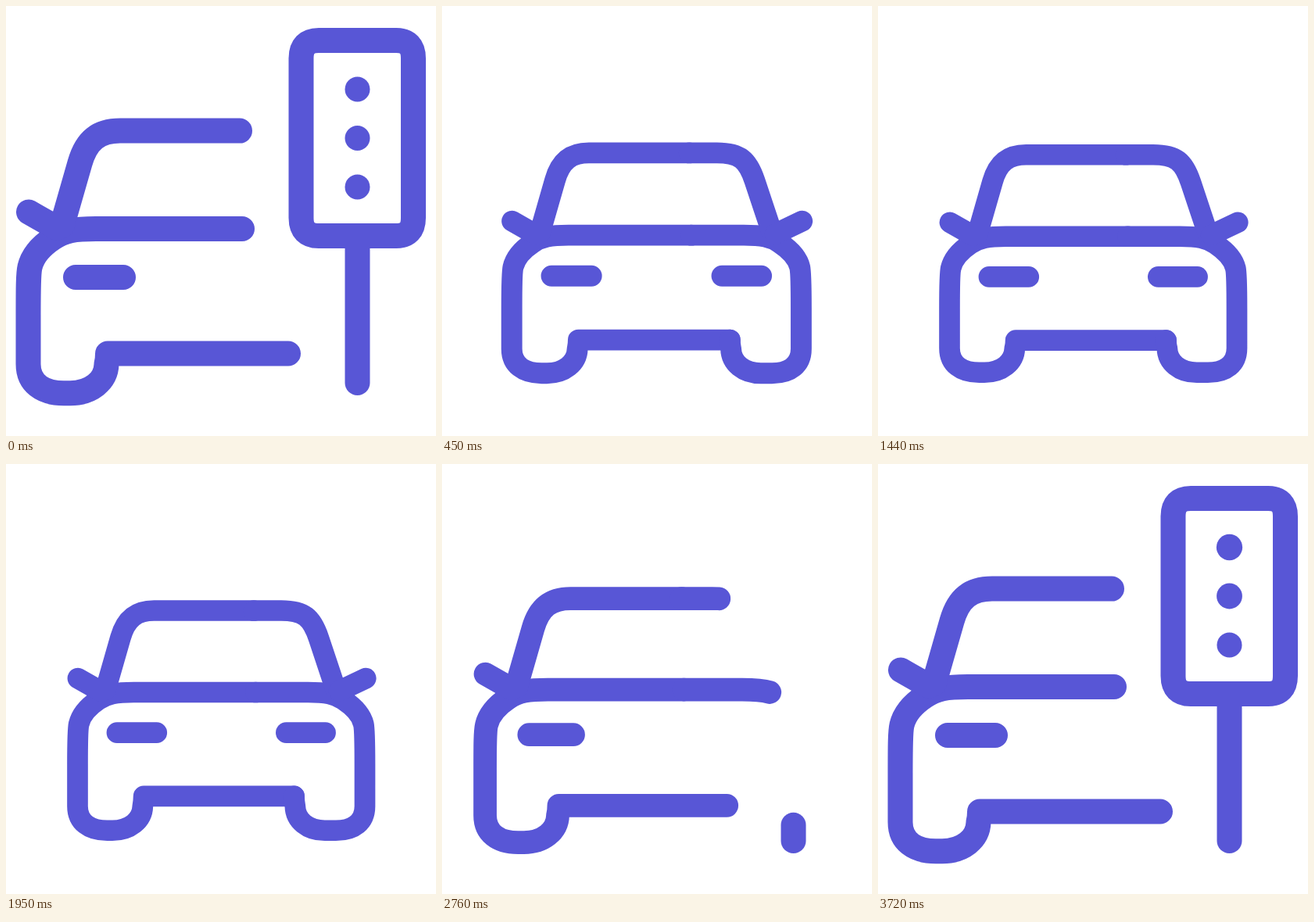
An HTML page for the animation above (3.75 s loop, 550 px wide and 550 px high).

```html
<!DOCTYPE html>
<html lang="en">
<head>
<meta charset="utf-8">
<title>Car and traffic light</title>
<style>
  html, body { margin: 0; width: 100%; height: 100%; overflow: hidden; background: #fff; }
  svg { display: block; width: 100vw; height: 100vh; }
  .line { fill: none; stroke: #5856d6; stroke-width: 32; stroke-linecap: round; stroke-linejoin: round; }
  #dots { fill: #5856d6; }
</style>
</head>
<body>
<svg viewBox="0 0 550 550">
  <g id="car" class="line">
    <path id="left"/>
    <path id="right" pathLength="1"/>
    <g id="body">
      <path d="M29 263.5L65 284M72 281L75 269L94.5 201C103 171 119 159.6 146 159.6H299M89 347H150"/>
      <path id="roof" pathLength="1" d="M299 159.6H341C376 159.6 388 170 398.7 202L421 269L425 281"/>
      <path id="mirror" pathLength="1" d="M430 283L471 263.5"/>
      <path id="lamp" pathLength="1" d="M348.7 347H409"/>
    </g>
  </g>
  <g class="line">
    <path id="pole" pathLength="1" d="M449.5 482V294"/>
    <path id="frame" pathLength="1" d="M449.5 294H400Q377.5 294 377.5 271V67Q377.5 44 400 44H499Q521 44 521 67V271Q521 294 499 294Z"/>
  </g>
  <g id="dots">
    <circle cx="449.5" cy="106.5"/>
    <circle cx="449.5" cy="169"/>
    <circle cx="449.5" cy="231.5"/>
  </g>
</svg>
<script>
const LOOP = 3750;
const $ = id => document.getElementById(id);
const dots = [...$('dots').children];

const ramp = (t, a, b) => Math.min(1, Math.max(0, (t - a) / (b - a)));
const cubic = u => u < .5 ? 4 * u ** 3 : 1 - 4 * (1 - u) ** 3;
const sine = u => (1 - Math.cos(Math.PI * u)) / 2;
// Rises during the first span, falls during the second
const between = (t, a, b, c, d, ease = cubic) => ease(ramp(t, a, b)) - ease(ramp(t, c, d));

// Time and vertical offset of the body on its suspension
const bounce = [[600, 0], [870, 3.6], [1060, 1.2], [1260, 3.6], [1455, 1.2],
  [1700, 3.6], [1940, -1.5], [2190, 3.6], [2445, -.7], [2600, 0]];

function bob(t) {
  let y = 0;
  for (let i = 1; i < bounce.length; i++) {
    const [t0, y0] = bounce[i - 1], [t1, y1] = bounce[i];
    y += (y1 - y0) * sine(ramp(t, t0, t1));
  }
  return y;
}

function trim(id, p) {
  const el = $(id);
  el.style.visibility = p > .001 ? 'visible' : 'hidden';
  el.setAttribute('stroke-dasharray', p > .999 ? 'none' : `${p} 2`);
}

function dotSize(t, i) {
  const start = 3015 - i * 67;
  if (t < start) return 1 - cubic(ramp(t, i * 30, 220 + i * 30));
  const s = (t - start) / 1000;
  return 1 - Math.exp(-4.5 * s) * Math.cos(13 * s);
}

function outline(b) {
  const y = v => v + b;
  $('left').setAttribute('d',
    `M302 ${y(285)}H115C88 ${y(285)} 74 ${y(287)} 60 ${y(297)}` +
    `C45 ${y(307)} 34 ${y(319)} 30.5 ${y(334)}C28.5 ${y(343)} 28.5 ${y(360)} 28.5 ${y(395)}` +
    `V458C28.5 482 46 495.3 74 495.3H82C108 495.3 128 480 128.5 458` +
    `Q130 ${y(452)} 130 ${y(444.5)}H361`);
  $('right').setAttribute('d',
    `M302 ${y(285)}H382C409 ${y(285)} 423 ${y(287)} 437 ${y(297)}` +
    `C452 ${y(307)} 464 ${y(319)} 467.5 ${y(334)}C469.5 ${y(343)} 469.5 ${y(360)} 469.5 ${y(395)}` +
    `V458C469.5 482 453 495.3 425 495.3H408C382 495.3 363 480 362.5 458` +
    `Q361 ${y(452)} 361 ${y(444.5)}`);
}

function draw(t) {
  const p = between(t, 0, 570, 2550, 2950);
  const scale = 1 - p / 6;
  const nudge = -2 * between(t, 2800, 2930, 2930, 3330, sine);
  const b = bob(t) / scale;
  $('car').setAttribute('transform', `translate(${67.75 * p + nudge} ${56 * p}) scale(${scale})`);
  $('body').setAttribute('transform', `translate(0 ${b})`);
  outline(b);

  trim('right', between(t, 60, 440, 2550, 2900));
  trim('roof', between(t, 60, 420, 2550, 2900));
  trim('mirror', between(t, 250, 430, 2550, 2720));
  trim('lamp', between(t, 200, 420, 2550, 2750));
  trim('frame', 1 - between(t, 0, 340, 2750, 3010));
  trim('pole', 1 - between(t, 60, 380, 2710, 2880));
  dots.forEach((d, i) => d.setAttribute('r', 16 * dotSize(t, i)));
}

const begin = performance.now();
function tick() {
  draw((performance.now() - begin) % LOOP);
  requestAnimationFrame(tick);
}
tick();
</script>
</body>
</html>
```
